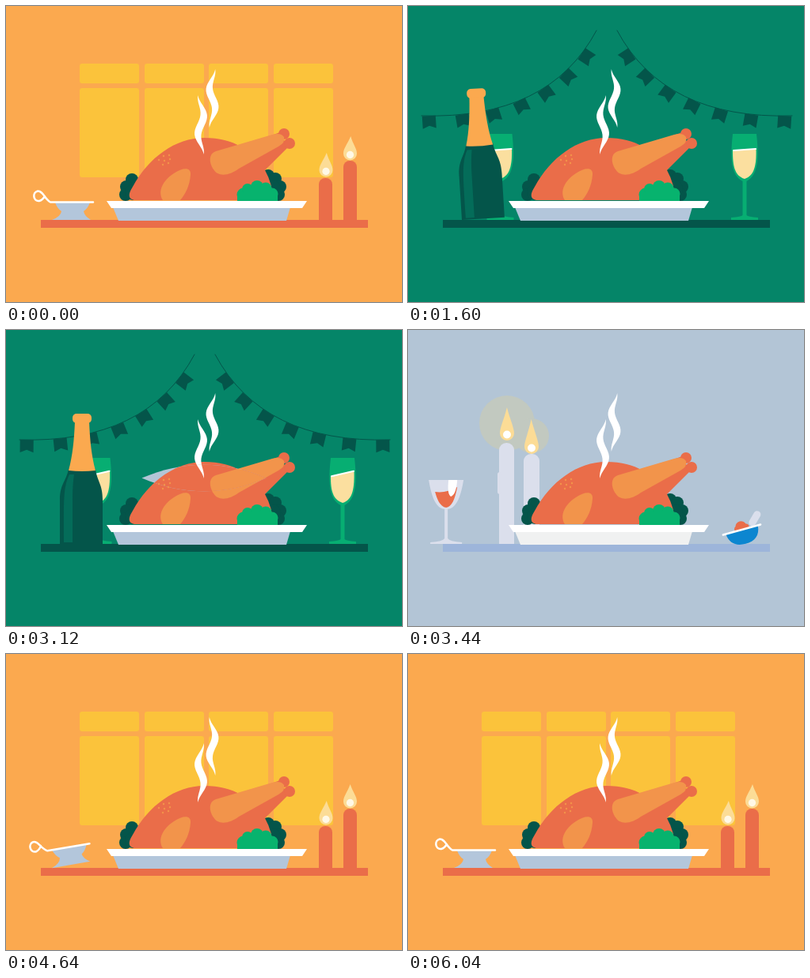
Animation of 500 by 375 pixels, one loop 6.08 s. Source, as an HTML page with a canvas:

```html
<!DOCTYPE html>
<html lang="en">
<head>
<meta charset="utf-8">
<title>Holiday dinner</title>
<style>
html, body { margin: 0; width: 500px; height: 375px; overflow: hidden; }
canvas { display: block; }
</style>
</head>
<body>
<canvas id="stage" width="500" height="375"></canvas>
<script>
const ctx = document.getElementById('stage').getContext('2d');
const LOOP = 6080, TAU = Math.PI * 2;
const C = {
  orange: '#fba94f', yellow: '#fbc33b', red: '#ea6d49', roast: '#f2944b',
  dark: '#04554a', green: '#058568', leaf: '#07b36e', glass: '#07ae72',
  mist: '#b3c5d6', steel: '#b3c6db', pale: '#dbdfec', flame: '#fcdc96',
  cream: '#fff8e6', white: '#fff'
};

const clamp = (v, lo, hi) => Math.min(hi, Math.max(lo, v));

function fill(color, d) {
  ctx.fillStyle = color;
  ctx.fill(new Path2D(d));
}
function line(color, width, d) {
  ctx.strokeStyle = color;
  ctx.lineWidth = width;
  ctx.lineCap = ctx.lineJoin = 'round';
  ctx.stroke(new Path2D(d));
}
function box(color, x, y, w, h, r = 0) {
  ctx.fillStyle = color;
  ctx.beginPath();
  ctx.roundRect(x, y, w, h, r);
  ctx.fill();
}
function dots(color, ...list) {
  ctx.fillStyle = color;
  for (const [x, y, r] of list) {
    ctx.beginPath();
    ctx.arc(x, y, r, 0, TAU);
    ctx.fill();
  }
}
function at(x, y, degrees, draw) {
  ctx.save();
  ctx.translate(x, y);
  ctx.rotate(degrees * Math.PI / 180);
  draw();
  ctx.restore();
}

function flame(x, y, r, height, core, time) {
  const tip = x + Math.sin(time / LOOP * TAU * 9 + x) * 0.9;
  fill(C.flame, `M${tip},${y - height} C${x + r * 0.4},${y - height * 0.55} ${x + r},${y - r * 0.8} ${x + r},${y}
    A${r},${r} 0 0 1 ${x - r},${y} C${x - r},${y - r * 0.8} ${x - r * 0.4},${y - height * 0.55} ${tip},${y - height}Z`);
  dots(core, [x, y + 1.5, r * 0.55]);
}

function steam(x, top, height, bend) {
  const left = [], right = [];
  for (let i = 0; i <= 24; i++) {
    const s = i / 24, y = top + s * height;
    const mid = x - 3.7 * bend * Math.cos(3 * Math.PI * s);
    const half = 4.9 * Math.sin(Math.PI * s) ** 1.1;
    left.push(`${mid - half},${y}`);
    right.unshift(`${mid + half},${y}`);
  }
  fill(C.white, 'M' + [...left, ...right].join('L') + 'Z');
}

function dinner(time, shade) {
  dots(C.dark, [159, 220, 8], [152, 229, 8], [151, 239, 8], [160, 236, 10],
    [331, 215, 8], [340, 219, 8], [346, 229, 8], [344, 239, 8], [335, 232, 12]);

  fill(C.red, `M162,246 C153,244 155,237 160,229 C180,192 214,167 250,167
    C270,167 284,171 296,178 L346,160 L356,179 L327,208 Q337,226 337,246Z`);
  dots(C.red, [351, 162, 7], [358, 174, 7]);
  fill(C.roast, `M265,184 L336,163 Q347,160 351,166 Q353,173 344,178
    L294,206 C282,215 268,217 262,207 C256,198 256,187 265,184Z`);
  fill(C.roast, `M198,246 C191,235 198,221 212,212 C224,204 234,204 233,214
    C232,228 226,239 220,246Z`);
  dots(C.roast, [199, 190, 1.2], [206, 189, 1.2], [193, 195, 1.2], [200, 196, 1.2],
    [207, 194, 1.2], [198, 201, 1.2], [205, 199, 1.2]);

  dots(C.leaf, [300, 239, 8.5], [305, 232, 7], [317, 229, 8], [328, 231, 7.5], [336, 238, 7.5]);
  box(C.leaf, 300, 231, 36, 16);
  box(C.leaf, 292, 239, 51, 8);

  fill(shade, 'M135,255 H359 L354,272 H142Z');
  fill(C.white, 'M127,247 H380 L374,256 H133Z');

  // Each wisp holds one bend, then flips to the other.
  const phase = time / LOOP * 6 * TAU;
  const bend = p => clamp(Math.sin(p) * 8, -1, 1);
  steam(246, 113, 75, bend(phase + 0.2 * TAU));
  steam(260.5, 80, 74, bend(phase + 0.57 * TAU));
}

const rocking = (t, size, period, rest) =>
  size * Math.max(0, 1 - t / rest) * Math.cos(TAU * t / period);

function gravyBoat(t) {
  const tilt = rocking(t, -14.5, 560, 1720);
  const pivot = tilt < 0 ? 59 : 107;
  at(pivot, 271, tilt, () => {
    ctx.translate(-pivot, -271);
    fill(C.steel, 'M62,249 H106 Q103,257 98,260 Q99,266 107,271 H58 Q69,267 70,260 Q65,257 62,249Z');
    line(C.white, 2.5, 'M110,248.500 H56 C48,244 47,234 40,234.500 C33,236 34,248 42,247 Q46,246 49,241');
  });
}

function homeScene(t, time) {
  for (const x of [93, 175, 256, 338]) {
    box(C.yellow, x, 73, 75, 25, 3);
    box(C.yellow, x, 104, 75, 113, 3);
  }
  box(C.red, 395, 218, 17, 54, [8, 8, 0, 0]);
  box(C.red, 426, 196, 17, 76, [8, 8, 0, 0]);
  flame(404, 208, 8.5, 22, C.cream, time);
  flame(434.5, 187, 8.5, 22, C.cream, time);
  box(C.red, 44, 271, 413, 10);
  gravyBoat(t);
}

function flute(x, slosh) {
  at(x, 0, 0, () => {
    fill(C.glass, `M-15,162 H15 C18,190 18,214 2.500,222 V265 Q4,267 17,268
      V271 H-17 V268 Q-4,267 -2.500,265 V222 C-18,214 -18,190 -15,162Z`);
    const l = 182 + slosh, r = 182 - slosh;
    fill('#fbdf9f', `M-15,${l} L14.500,${r} C15,200 13,215 0,219 C-13,215 -15,202 -15,${l}Z`);
    line(C.white, 2, `M-14,${l} L14,${r}`);
  });
}

function bunting(sway) {
  line(C.dark, 1, 'M238,31 Q178,144 17,139');
  for (let i = 0; i < 7; i++) {
    const s = 0.14 + 0.1385 * i;
    const x = 238 - 120 * s - 101 * s * s;
    const y = 31 + 226 * s - 118 * s * s;
    const slope = Math.atan2(236 * s - 226, 120 + 202 * s) * 180 / Math.PI;
    at(x, y, slope + sway, () => fill(C.dark, 'M-8.500,0 H8.500 V16 L0,12.500 L-8.500,16Z'));
  }
}

function partyScene(t) {
  const fade = Math.max(0, 1 - t / 1900);
  const swing = fade * Math.sin(TAU * t / 660);
  bunting(swing * 6);
  ctx.save();
  ctx.translate(502, 0);
  ctx.scale(-1, 1);
  bunting(swing * 6);
  ctx.restore();

  const slosh = 4 * Math.cos(TAU * t / 660);
  flute(116.5, slosh);
  flute(425, slosh);
  box(C.dark, 44, 271, 413, 10);

  const pivot = swing < 0 ? 68 : 122;
  at(pivot, 271, swing * 5, () => {
    ctx.translate(-pivot, -271);
    fill(C.dark, 'M68,271 V215 C68,195 76,192 79,176 H113 C115,192 122,195 122,215 V271Z');
    fill('#046c59', 'M80,183 C72,200 73,215 73,269 H84 V215 C84,200 85,190 86,183Z');
    fill(C.orange, 'M87,116 H105 C106,140 108,160 113,178 Q96,180 79,178 C84,160 86,140 87,116Z');
    box(C.orange, 84, 106, 24, 12, 5);
  });
}

function wineGlass(x, slosh) {
  at(x, 0, 0, () => {
    fill(C.pale, `M-22,190 H22 C19,208 14,226 2,227 V264 Q4,268 20,269 V271
      H-20 V269 Q-4,268 -2,264 V227 C-14,226 -19,208 -22,190Z`);
    fill(C.red, `M-14,${202 - slosh} Q0,207 14,${202 + slosh} C11,215 7,224 0,225 C-8,224 -12,213 -14,${202 - slosh}Z`);
    fill(C.white, 'M3,190 H14 Q13,208 6,211 Q1,208 3,190Z');
  });
}

function sauceBowl(t) {
  const tilt = rocking(t - 360, -15.5, 507, 2040);
  at(419 - 0.16 * tilt, 253, tilt, () => {
    at(12, -2, -44, () => box(C.pale, 0, -4.5, 21, 9, 4.5));
    dots(C.red, [0, -4, 7], [-5, -2, 4], [6, -2, 4]);
    fill('#0c86d0', 'M-21,0 H21 C20,13 12,18.500 0,18.500 C-12,18.500 -20,13 -21,0Z');
    line(C.white, 2.5, 'M-24.500,0 H24.500');
  });
}

function winterScene(t, time) {
  dots('#c2c9c0', [125, 118, 35], [156, 134, 22]);
  box(C.pale, 146, 157, 20, 115, [9, 9, 0, 0]);
  box(C.pale, 115, 143, 19, 129, [9, 9, 0, 0]);
  box(C.pale, 113, 180, 6, 28, 3);
  flame(156, 148, 9, 35, C.white, time);
  flame(125, 131, 9, 33, C.white, time);
  box('#9db5da', 44, 271, 413, 10);
  wineGlass(33 + 0.042 * t, -3 * Math.cos(TAU * (t - 360) / 1520));
  sauceBowl(t);
}

const scenes = [
  { start: 1080, bg: C.green, shade: C.steel, props: partyScene },
  { start: 3080, bg: C.mist, shade: '#f0f1f1', props: winterScene },
  { start: 4080, bg: C.orange, shade: C.steel, props: homeScene }
];
const age = (scene, time) => (time - scene.start + LOOP) % LOOP;

function paint(scene, time) {
  box(scene.bg, 0, 0, 500, 375);
  scene.props(age(scene, time), time);
  dinner(time, scene.shade);
}

// A lens that rounds into an ellipse as it grows.
function iris(t) {
  const rx = 31 + 1.16 * t, ry = Math.max(0, rx - 61.7);
  const round = clamp((t - 40) / 80, 0, 1);
  const a = rx * (1 / 3 + 0.219 * round);
  const tx = rx * (2 / 3 + round / 3);
  const ty = ry * (2 / 3 - 0.114 * round);
  const path = new Path2D(`M${-rx},0 C${-tx},${-ty} ${-a},${-ry} 0,${-ry}
    C${a},${-ry} ${tx},${-ty} ${rx},0 C${tx},${ty} ${a},${ry} 0,${ry}
    C${-a},${ry} ${-tx},${ty} ${-rx},0Z`);
  const moved = new Path2D();
  moved.addPath(path, new DOMMatrix([1, 0, 0, 1, 250, 187.5]));
  return moved;
}

function render(time) {
  const order = [...scenes].sort((p, q) => age(p, time) - age(q, time));
  const t = age(order[0], time);
  ctx.save();
  if (t < 400) {
    paint(order[1], time);
    ctx.clip(iris(t));
  }
  paint(order[0], time);
  ctx.restore();
}

const begin = performance.now();
function tick() {
  render((performance.now() - begin) % LOOP);
  requestAnimationFrame(tick);
}
tick();
</script>
</body>
</html>
```
